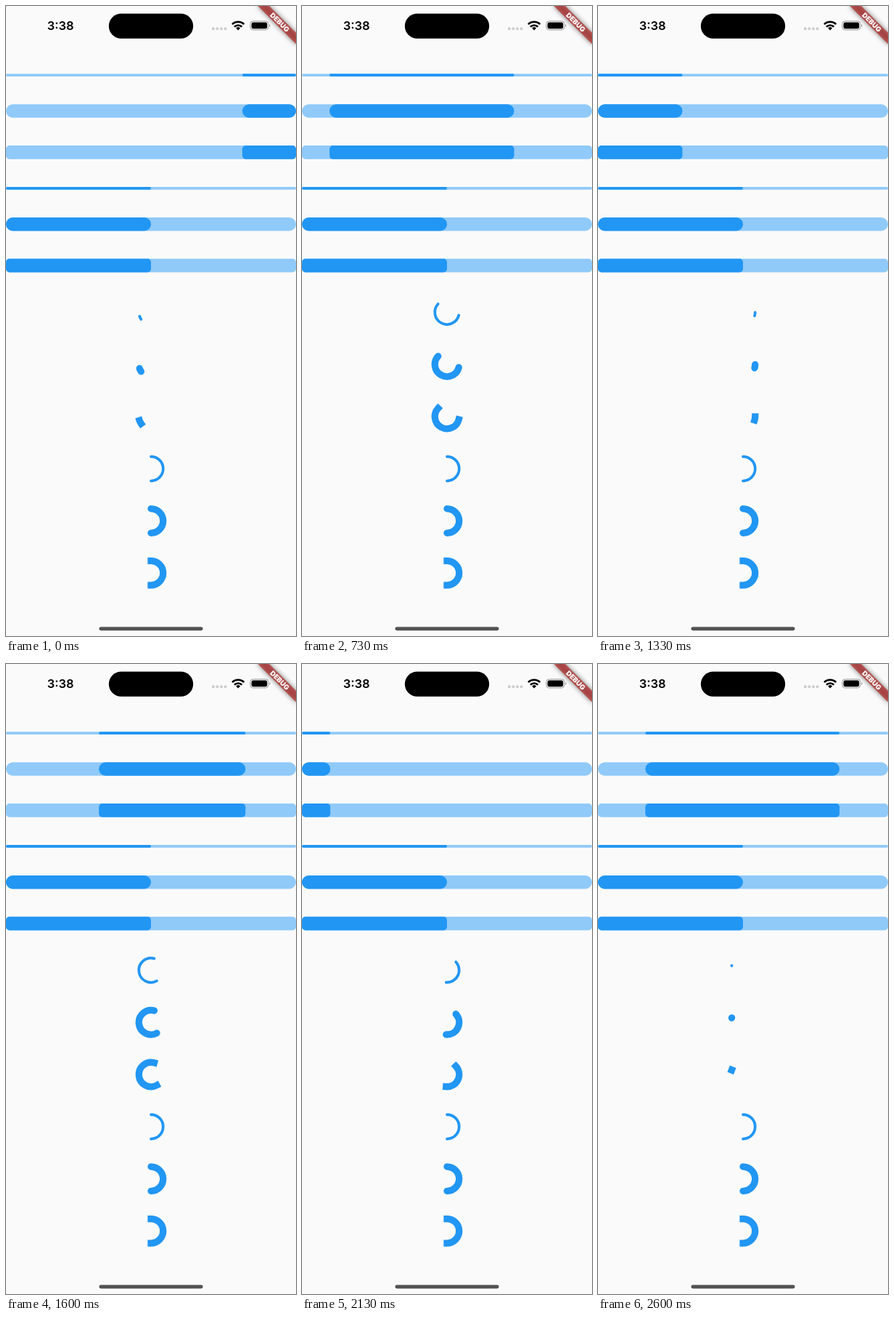
Animation, 400 px wide and 867 px high, one loop 2670 ms. Source, as an HTML page:

```html
<!DOCTYPE html>
<html lang="en">
<head>
<meta charset="utf-8">
<title>Progress indicators</title>
<style>
  html, body { margin: 0; width: 100%; height: 100%; overflow: hidden; background: #fafafa; }
  svg { display: block; width: 400px; height: 867px; }
  text { font-family: Inter, Roboto, sans-serif; text-anchor: middle; }
  .track { fill: #90caf9; }
  .bar { fill: #2196f3; }
  .arc { fill: none; stroke: #2196f3; }
</style>
</head>
<body>
<svg viewBox="0 0 400 867">
  <defs>
    <filter id="blur" x="-50%" y="-150%" width="200%" height="400%"><feGaussianBlur stdDeviation="3.9"/></filter>
  </defs>

  <text x="75.2" y="33" font-size="16.5" font-weight="600">3:38</text>
  <rect x="141.8" y="10.5" width="116.4" height="34.2" rx="17.1"/>
  <g fill="#cacaca">
    <rect x="284" y="29.5" width="3.6" height="3.6" rx="1"/>
    <rect x="289.6" y="29.5" width="3.6" height="3.6" rx="1"/>
    <rect x="295.2" y="29.5" width="3.6" height="3.6" rx="1"/>
    <rect x="300.8" y="29.5" width="3.6" height="3.6" rx="1"/>
  </g>
  <g fill="none" stroke="#000" stroke-width="2.5">
    <path d="M312 25.2A11.6 11.6 0 0 1 328.4 25.2"/>
    <path d="M315 28.6A7.3 7.3 0 0 1 325.4 28.6"/>
  </g>
  <path d="M320.2 33.4L317.3 30.5A4.2 4.2 0 0 1 323.1 30.5Z"/>
  <rect x="336.9" y="20.9" width="25" height="12" rx="3.8" fill="none" stroke="#999"/>
  <rect x="338.6" y="22.6" width="21.6" height="8.6" rx="2.3"/>
  <path d="M363.4 25A2.4 2.4 0 0 1 363.4 29Z" fill="#999"/>

  <g id="stage" transform="scale(.93023)"></g>

  <g transform="translate(400 0) rotate(45) scale(.93023)">
    <rect x="-40" y="28" width="80" height="12" opacity=".5" filter="url(#blur)"/>
    <rect x="-40" y="28" width="80" height="12" fill="#b71c1c" opacity=".63"/>
    <text y="37.7" font-size="10.2" font-weight="900" fill="#fff">DEBUG</text>
  </g>
  <rect x="128.4" y="854.6" width="143.2" height="4.8" rx="2.4" fill="#525252"/>
</svg>
<script>
const W = 430, R = 18, GAP = 535 / 13;
const stage = document.getElementById('stage');

function add(tag, attrs) {
  const el = document.createElementNS('http://www.w3.org/2000/svg', tag);
  for (const k in attrs) el.setAttribute(k, attrs[k]);
  return stage.appendChild(el);
}

// Cubic easing whose control points have y = 0 and y = 1.
function cubic(x1, x2) {
  return x => {
    if (x <= 0) return 0;
    if (x >= 1) return 1;
    let lo = 0, hi = 1;
    for (let i = 0; i < 30; i++) {
      const s = (lo + hi) / 2, u = 1 - s;
      if (3 * x1 * s * u * u + 3 * x2 * s * s * u + s * s * s < x) lo = s; else hi = s;
    }
    return lo * lo * (3 - 2 * lo);
  };
}

const head1 = cubic(.2, .8), tail1 = cubic(.4, 1);
const head2 = cubic(0, .65), tail2 = cubic(.1, .45);
const swift = cubic(.4, .2);

function setBar(el, from, to, r) {
  const w = Math.max(0, to - from) * W;
  el.setAttribute('x', from * W);
  el.setAttribute('width', w);
  el.setAttribute('rx', Math.min(r, w / 2));
}

function setArc(el, y, start, sweep) {
  const pt = a => `${W / 2 + R * Math.cos(a)} ${y + R * Math.sin(a)}`;
  el.setAttribute('d', `M${pt(start)}A${R} ${R} 0 ${+(sweep > Math.PI)} 1 ${pt(start + sweep)}`);
}

// Column of evenly spaced rows: bars, then rings; each kind first moving, then fixed.
const lines = [], rings = [];
let rowY = 59 + GAP;
for (const fixed of [false, true]) {
  for (const [height, r] of [[4, 2], [20, 10], [20, 5]]) {
    add('rect', { class: 'track', y: rowY, width: W, height, rx: r });
    const bar = () => add('rect', { class: 'bar', y: rowY, height });
    if (fixed) setBar(bar(), 0, .5, r);
    else lines.push({ a: bar(), b: bar(), r });
    rowY += height + GAP;
  }
}
for (const fixed of [false, true]) {
  for (const [width, cap] of [[4, 'round'], [10, 'round'], [10, 'square']]) {
    const el = add('path', { class: 'arc', 'stroke-width': width, 'stroke-linecap': cap });
    const y = rowY + R;
    if (fixed) setArc(el, y, -Math.PI / 2, Math.PI);
    else rings.push({ el, y });
    rowY += 2 * R + GAP;
  }
}

function draw(t) {
  const p = (t + 1583) % 1800;
  for (const { a, b, r } of lines) {
    setBar(a, tail1((p - 333) / 750), head1(p / 750), r);
    setBar(b, tail2((p - 1267) / 533), head2((p - 1000) / 567), r);
  }
  const q = (t + 97) % 1333 / 1333, turn = (t + 1407) / 2222;
  const head = swift(q * 2), tail = swift(q * 2 - 1);
  const start = Math.PI * (-.5 + 1.5 * tail + 2 * turn + .5 * q);
  const sweep = Math.max(1.5 * Math.PI * (head - tail), .01);
  for (const { el, y } of rings) setArc(el, y, start, sweep);
}

// 15 steps per second, with step times rounded to 10 ms.
const t0 = performance.now();
function tick() {
  const t = (performance.now() - t0) % 2670;
  draw(Math.floor((Math.floor(t / 10) + .4) * .15) * 200 / 3);
  requestAnimationFrame(tick);
}
tick();
</script>
</body>
</html>
```
